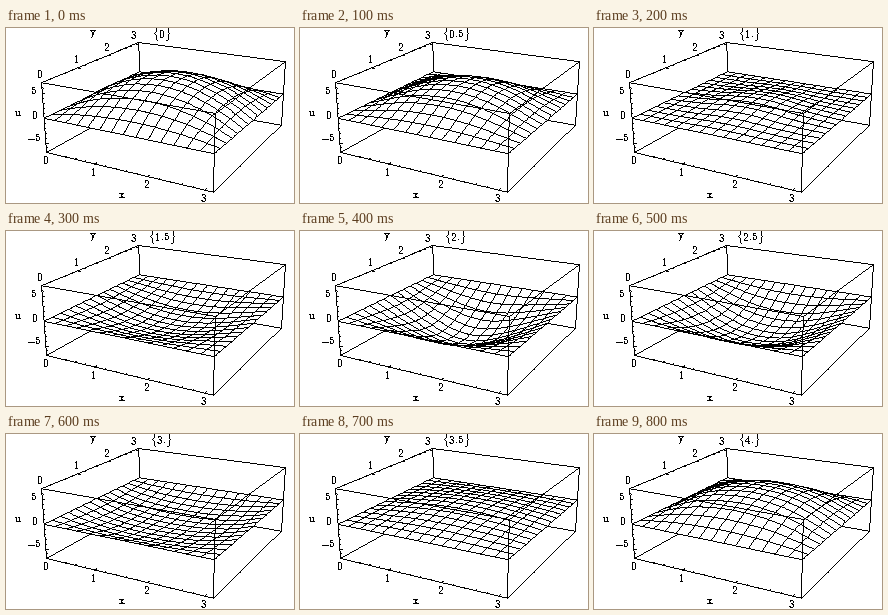
A matplotlib script that plays this animation: 288 by 175 pixels, repeating every 0.9 s.

```python
import numpy as np
import matplotlib.pyplot as plt
from matplotlib.animation import FuncAnimation
from matplotlib.collections import PathCollection
from matplotlib.path import Path

W, H, DPI = 288, 175, 100
PX = 72 / DPI
FRAMES, STEP_MS = 9, 100
U_MAX = 7
CELLS = 14

plt.rcParams.update({"mathtext.fontset": "cm", "text.antialiased": False})

# Perspective camera around a 1 x 1 x 0.4 box
EYE = np.array([1.6, -3.0, 1.2])
DIST = np.linalg.norm(EYE)
FWD = -EYE / DIST
RIGHT = np.cross(FWD, [0, 0, 1])
RIGHT /= np.linalg.norm(RIGHT)
UP = np.cross(RIGHT, FWD)
SCALE, CX, CY = 636, 164.2, 77.5


def project(x, y, u):
    """Map data coordinates to stage pixels and depth."""
    p = np.stack(np.broadcast_arrays(
        x / np.pi - 0.5, y / np.pi - 0.5, 0.2 * u / U_MAX), axis=-1)
    depth = DIST + p @ FWD
    xy = np.stack([CX + SCALE * (p @ RIGHT) / depth,
                   CY - SCALE * (p @ UP) / depth], axis=-1)
    return xy, depth


def membrane(x, y, t):
    """Wave on a square membrane released from x(pi-x) y(pi-y)."""
    u = np.zeros_like(x)
    for m in range(1, 12, 2):
        for n in range(1, 12, 2):
            u += (64 / (np.pi**2 * (m * n)**3) * np.sin(m * x) * np.sin(n * y)
                  * np.cos(np.hypot(m, n) * t))
    return u


SQUARE = np.array([(0, 0), (1, 0), (1, 1), (0, 1), (0, 0)])
SQUARE_CODES = [Path.MOVETO] + [Path.LINETO] * 3 + [Path.CLOSEPOLY]


def pixel_line(points):
    """Crisp one-pixel polyline as a path of unit squares."""
    dots = []
    for a, b in zip(points[:-1], points[1:]):
        n = int(np.abs(b - a).max()) + 2
        dots.append(np.floor(np.linspace(a, b, n)))
    dots = np.unique(np.concatenate(dots), axis=0)
    verts = (dots[:, None] + SQUARE).reshape(-1, 2)
    return Path(verts, SQUARE_CODES * len(dots))


fig = plt.figure(figsize=(W / DPI, H / DPI), dpi=DPI, facecolor="white")
ax = fig.add_axes([0, 0, 1, 1])
ax.set(xlim=(0, W), ylim=(H, 0))
ax.axis("off")


def add_paths(paths, colors, z):
    art = PathCollection(paths, facecolors=colors, edgecolors="none",
                         linewidths=0, zorder=z)
    ax.add_collection(art, autolim=False)
    return art


def lines(segments, z):
    add_paths([pixel_line(project(*np.array(s, float).T)[0]) for s in segments],
              "black", z)


def typed(s):
    return rf"$\mathtt{{{s}}}$"


def label(x, y, s):
    return ax.text(x, y, typed(s), size=11.4 * PX, ha="center", va="center", zorder=5)


# Box edges: the far corner is (0, pi)
P, U = np.pi, U_MAX
far = [[(0, P, -U), (0, P, U)], [(0, 0, -U), (0, P, -U)], [(0, P, -U), (P, P, -U)],
       [(0, 0, U), (0, P, U)], [(0, P, U), (P, P, U)]]
near = [[(x, y, -U), (x, y, U)] for x, y in ((0, 0), (P, 0), (P, P))]
for u in (-U, U):
    near += [[(0, 0, u), (P, 0, u)], [(P, 0, u), (P, P, u)]]
lines(far, 1)
lines(near, 3)

# Ticks
ticks = []
for i in range(16):
    v, size = i / 5, 0.06 if i % 5 == 0 else 0.03
    ticks += [[(v, 0, -U), (v, size, -U)], [(0, v, U), (size, v, U)]]
for u in range(-U, U + 1):
    ticks.append([(0, 0, u), (0.05 if u % 5 == 0 else 0.025, 0, u)])
lines(ticks, 3)

for v in range(4):
    x, y = project(v, 0, -U)[0]
    label(x - 1, y + 7.5, str(v))
    x, y = project(0, v, U)[0]
    label(x - 1.5, y - 8.5, str(v))
label(28, 63, "5")
label(29, 87, "0")
label(28, 110, "-5")
label(116, 167, "x")
label(87, 6, "y")
label(12, 85, "u")
clock = label(156, 6, "0")

# Surface cells, painted from back to front: white face, then black outline
grid = np.linspace(0, P, CELLS + 1)
gx, gy = np.meshgrid(grid, grid, indexing="ij")
mid = (grid[:-1] + grid[1:]) / 2
order = np.argsort(-project(*np.meshgrid(mid, mid, indexing="ij"), 0)[1].ravel())
surface = add_paths([], ["white", "black"], 2)


def draw(i):
    t = i / 2
    q = project(gx, gy, membrane(gx, gy, t))[0]
    cells = np.stack([q[:-1, :-1], q[1:, :-1], q[1:, 1:], q[:-1, 1:], q[:-1, :-1]],
                     axis=2)
    paths = []
    for cell in cells.reshape(-1, 5, 2)[order]:
        paths += [Path(cell), pixel_line(cell)]
    surface.set_paths(paths)
    # \! takes back the space set after a closing point
    dot = r".\!" if t and t == int(t) else ""
    clock.set_text(typed(rf"\{{{t:g}{dot}\}}"))
    return surface, clock


anim = FuncAnimation(fig, draw, frames=FRAMES, interval=STEP_MS, repeat=True)
plt.show()
```
